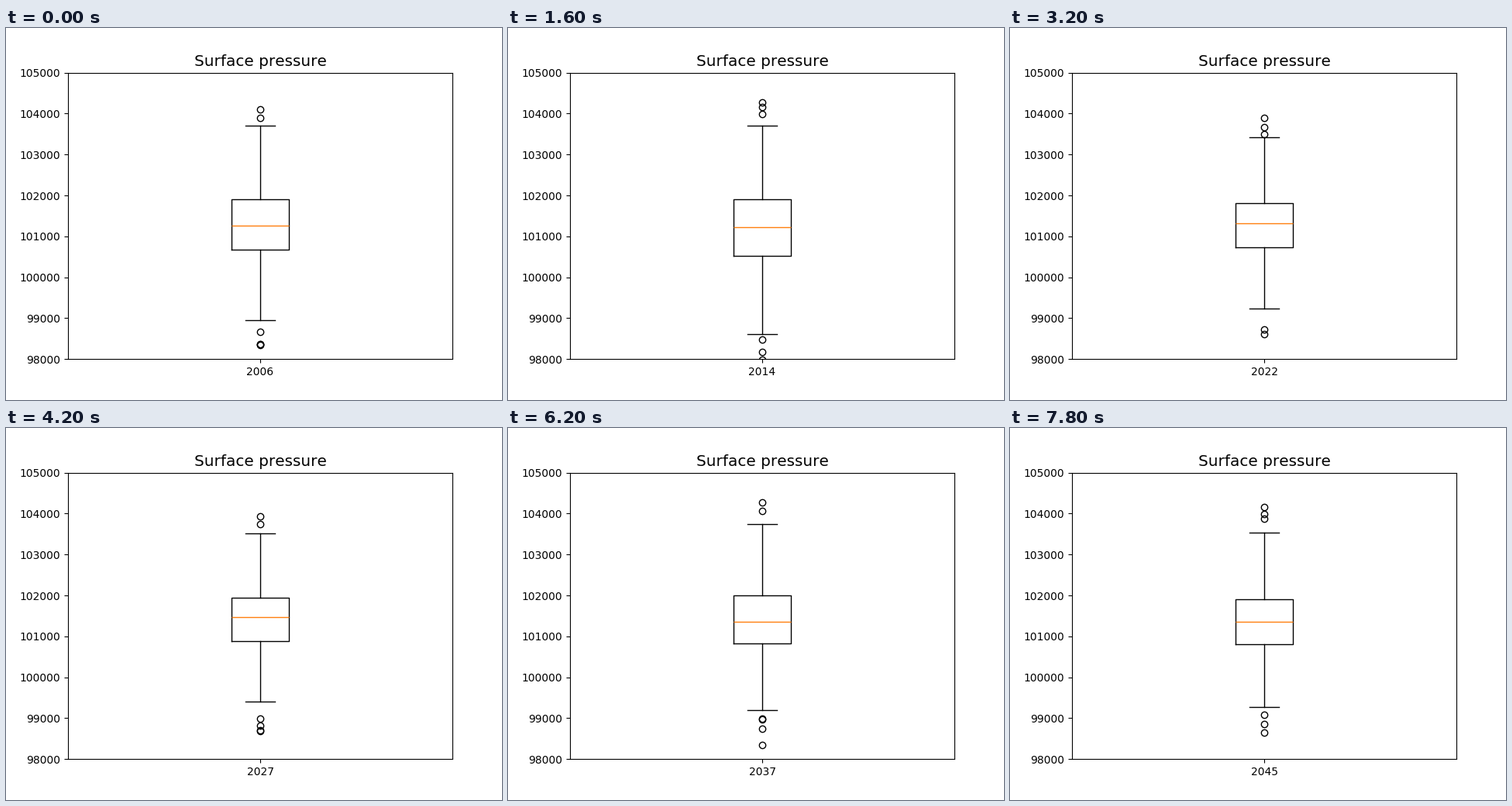
Write a matplotlib script that moves like this. It is 640 by 480 pixels and loops after 8000 ms.

```python
import random

import matplotlib.pyplot as plt
import numpy as np
from matplotlib.animation import FuncAnimation

plt.rcParams["text.kerning_factor"] = 6

FIRST_YEAR, YEARS, STEP_MS = 2006, 40, 200

# Quartiles at a few key years; the years between drift from one to the next.
KEY_YEARS = np.array([2006, 2010, 2017, 2027, 2033, 2037, 2045])
Q1 = [100670, 100520, 100580, 100880, 101015, 100825, 100805]
MEDIAN = [101260, 101300, 101185, 101470, 101620, 101355, 101355]
Q3 = [101905, 101980, 101770, 101945, 102265, 102000, 101905]


def scatter(rng, count, near, far):
    return [rng.uniform(near, far) for _ in range(count)]


def year_stats(year):
    """Box, whiskers and outliers of one year."""
    rng = random.Random(year)
    wander = 20 * np.abs(KEY_YEARS - year).min()
    q1, med, q3 = (np.interp(year, KEY_YEARS, curve)
                   + rng.uniform(-wander, wander)
                   for curve in (Q1, MEDIAN, Q3))
    iqr = q3 - q1
    low = q1 - 1.39 * iqr
    high = q3 + min(1.48 * iqr, 1800)
    fliers = scatter(rng, rng.randint(2, 5), low - 130, low - 850)
    fliers += scatter(rng, rng.randint(0, 3), high + 70, high + 650)
    return dict(whislo=low, q1=q1, med=med, q3=q3, whishi=high,
                fliers=fliers, label=str(year))


fig, ax = plt.subplots(figsize=(6.4, 4.8), dpi=100)


def draw(frame):
    ax.clear()
    ax.bxp([year_stats(FIRST_YEAR + frame)], widths=0.15)
    ax.set_xlim(0.5, 1.5)
    ax.set_ylim(98000, 105000)
    ax.set_title("Surface pressure", fontsize=14.4)


anim = FuncAnimation(fig, draw, frames=YEARS, init_func=lambda: draw(0),
                     interval=STEP_MS, repeat=True, repeat_delay=0)
plt.show()
```
